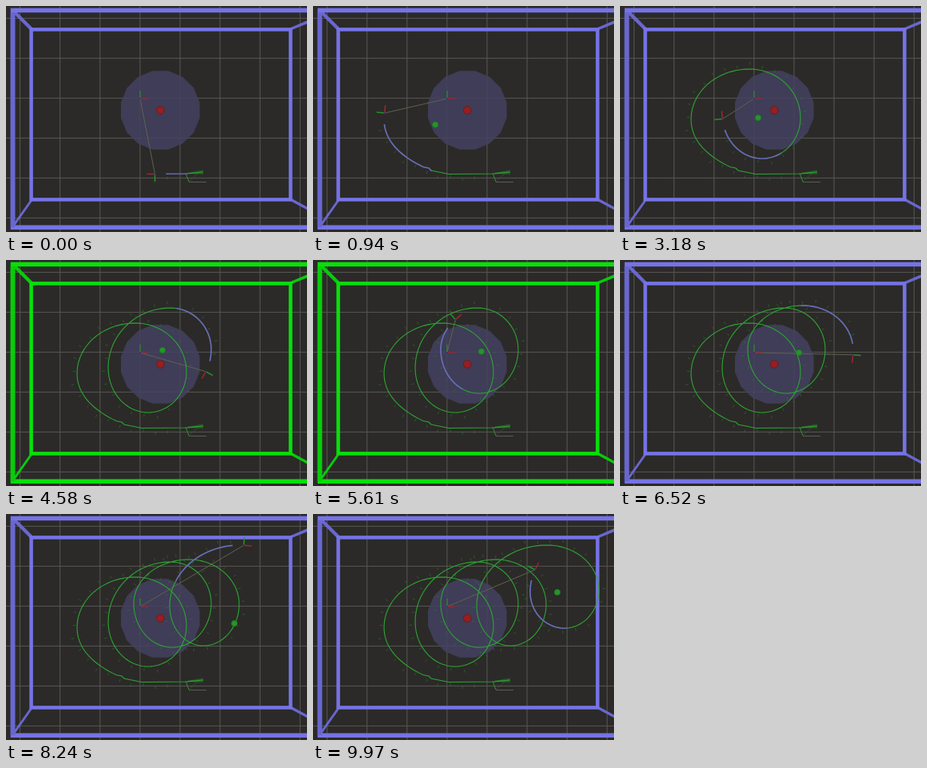
Animation of 377x283 px, one loop 10000 ms. Source, as an HTML page with a canvas:

```html
<!DOCTYPE html>
<html lang="en">
<head>
<meta charset="utf-8">
<title>Orbit trajectory</title>
<style>
  html, body { margin: 0; width: 100%; height: 100%; overflow: hidden; background: #2b2a28; }
  canvas { display: block; width: 100vw; height: 100vh; }
</style>
</head>
<body>
<canvas id="stage" width="377" height="283"></canvas>
<script>
const ctx = document.getElementById('stage').getContext('2d');
const LOOP = 10000, LEAD = 14, TAIL = 88;
const ZONE = { x: 193.3, y: 130.5, r: 50.3 };
const ORIGIN = { x: 168, y: 116, dx: 1, dy: 0 };

// Run-up to the first orbit, ending where a curve swings into the leftmost point.
const RUN_UP = [[247, 208], [227, 210], [170, 210.5], [148, 206], [145, 203], [138, 201.5]];

// Extremes of each clockwise orbit: left, top, right, bottom.
const EXTREMES = [
  [89, 142], [162, 79], [226, 140], [178, 191],
  [128, 135], [206, 60], [257, 112], [208, 167],
  [160, 112], [229, 57], [292, 113], [247, 165],
  [205, 115], [293, 39], [358, 95], [315, 143],
  [272, 98], [306, 49]
];

// Key positions of the orbit target: time, x, y.
const BALL = [
  [350, 152, 149], [1910, 155, 148], [3180, 173, 140], [4580, 196, 113],
  [6520, 224, 116], [8240, 286, 137], [9970, 306, 98]
];

const mix = (a, b, u) => a + (b - a) * u;

// Samples are [x, y, distance travelled].
const samples = [];
function addSample(x, y) {
  const prev = samples[samples.length - 1];
  samples.push([x, y, prev ? prev[2] + Math.hypot(x - prev[0], y - prev[1]) : 0]);
}

function addSwing([x0, y0], [x1, y1]) {
  for (let u = 0.05; u < 1; u += 0.05) {
    const bend = (1 - u) * (1 - u);
    addSample(mix(x1, x0, bend), mix(mix(y0, 178, u), mix(178, y1, u), u));
  }
}

// Quarter ellipse between neighbouring extremes.
function addQuarter([x0, y0], [x1, y1], fromSide) {
  for (let i = 0; i < 24; i++) {
    const a = i / 24 * Math.PI / 2, c = Math.cos(a), s = Math.sin(a);
    if (fromSide) addSample(mix(x1, x0, c), mix(y0, y1, s));
    else addSample(mix(x0, x1, s), mix(y1, y0, c));
  }
}

RUN_UP.forEach(p => addSample(...p));
addSwing(RUN_UP[RUN_UP.length - 1], EXTREMES[0]);
for (let i = 0; i + 1 < EXTREMES.length; i++) addQuarter(EXTREMES[i], EXTREMES[i + 1], i % 2 === 0);

// Steady cruise, slightly slower at the ends of the loop.
const tipDistance = t => 46.5 + 0.16 * t - 19 * Math.sin(2 * Math.PI * t / LOOP);

function poseAt(dist) {
  let i = samples.findIndex(s => s[2] > dist);
  if (i < 1) i = dist <= 0 ? 1 : samples.length - 1;
  const a = samples[i - 1], b = samples[i], len = b[2] - a[2];
  const u = (dist - a[2]) / len;
  return { x: mix(a[0], b[0], u), y: mix(a[1], b[1], u), dx: (b[0] - a[0]) / len, dy: (b[1] - a[1]) / len };
}

function ballAt(t) {
  const i = BALL.findIndex(k => k[0] > t);
  if (i < 0) return BALL[BALL.length - 1].slice(1);
  const [t0, x0, y0] = BALL[i - 1], [t1, x1, y1] = BALL[i];
  const u = (t - t0) / (t1 - t0);
  return [mix(x0, x1, u), mix(y0, y1, u)];
}

function line(x1, y1, x2, y2, color, width = 1) {
  ctx.strokeStyle = color;
  ctx.lineWidth = width;
  ctx.beginPath();
  ctx.moveTo(x1, y1);
  ctx.lineTo(x2, y2);
  ctx.stroke();
}

function box(left, top, right, bottom, color, width) {
  ctx.strokeStyle = color;
  ctx.lineWidth = width;
  ctx.strokeRect(left, top, right - left, bottom - top);
}

function sphere(x, y, r, color, rim) {
  ctx.beginPath();
  ctx.arc(x, y, r, 0, 2 * Math.PI);
  ctx.fillStyle = color;
  ctx.fill();
  ctx.strokeStyle = rim;
  ctx.lineWidth = 1;
  ctx.stroke();
}

function drawFloor() {
  ctx.fillStyle = '#2b2a28';
  ctx.fillRect(0, 0, 377, 283);
  for (let i = 0; i < 8; i++) {
    const x = 17.6 + i * 50.1, y = 15.4 + i * 50;
    line(x, 0, x, 283, '#575753');
    line(0, y, 377, y, '#575753');
  }
  ctx.beginPath();
  for (let i = 0; i < 16; i++) {
    const a = (i + 0.5) * Math.PI / 8;
    ctx.lineTo(ZONE.x + ZONE.r * Math.cos(a), ZONE.y + ZONE.r * Math.sin(a));
  }
  ctx.closePath();
  ctx.fillStyle = 'rgba(68, 65, 96, 0.85)';
  ctx.fill();
}

function drawCage(inside) {
  const front = inside ? '#08e00a' : '#7673e6';
  const side = inside ? '#08cc0a' : '#6967cf';
  line(8, 5, 32, 29, side, 4.5);
  line(8, 277, 32, 243, side, 3);
  line(356, 29, 380, 19, side, 3.5);
  line(356, 242, 380, 255, side, 3.5);
  box(8.5, 5.4, 400, 277.2, front, 5.5);
  line(8.5, 8, 8.5, 277, side, 5.5);
  box(31.6, 29.4, 356.4, 242.4, front, 4.5);
}

function drawSpan(from, to, color, width) {
  const a = poseAt(from), b = poseAt(to);
  ctx.strokeStyle = color;
  ctx.lineWidth = width;
  ctx.beginPath();
  ctx.moveTo(a.x, a.y);
  for (const s of samples) if (s[2] > from && s[2] < to) ctx.lineTo(s[0], s[1]);
  ctx.lineTo(b.x, b.y);
  ctx.stroke();
}

function drawTicks(tip) {
  for (let d = 45, i = 0; d < tip; d += 15, i++) {
    const p = poseAt(d), far = 7 + 2 * Math.sin(i * 2.3), near = far - 3.5;
    line(p.x + p.dy * near, p.y - p.dx * near, p.x + p.dy * far, p.y - p.dx * far, 'rgba(45, 130, 45, 0.55)');
  }
}

function drawStart() {
  for (let i = 0; i < 4; i++) line(227, 209.5, 247, 206 + i * 1.4, 'rgba(40, 150, 40, 0.5)');
  line(225, 209, 229, 220, '#2d952d');
  line(229, 220, 241, 209, 'rgba(50, 110, 50, 0.5)');
  line(229, 220.5, 251, 220.5, '#585c52');
}

function drawAxes(p, width) {
  const len = 10;
  line(p.x, p.y, p.x + p.dx * len, p.y + p.dy * len, '#a0282b', width);
  line(p.x, p.y, p.x + p.dy * len, p.y - p.dx * len, '#27902b', width);
  ctx.fillStyle = '#343678';
  ctx.fillRect(p.x - 1, p.y - 1, 2, 2);
}

function render(t) {
  const tip = tipDistance(t), tail = Math.max(20, tip - TAIL);
  const robot = poseAt(tip + LEAD);
  const inside = Math.hypot(robot.x - ZONE.x, robot.y - ZONE.y) < 58;

  drawFloor();
  drawCage(inside);
  line(ORIGIN.x, ORIGIN.y, robot.x, robot.y, '#5f6250');
  drawTicks(tip);
  drawStart();
  drawSpan(0, tail, '#2da532', 1.1);
  drawSpan(tail, tip, '#666eb4', 1.7);
  drawAxes(ORIGIN, 1.2);
  drawAxes(robot, 1.5);
  sphere(ZONE.x, ZONE.y, 4.8, '#961f23', '#701a1d');
  if (t >= BALL[0][0]) sphere(...ballAt(t), 3.6, '#24962a', '#1f7a24');
}

function frame(now) {
  render(now % LOOP);
  requestAnimationFrame(frame);
}
render(0);
requestAnimationFrame(frame);
</script>
</body>
</html>
```
